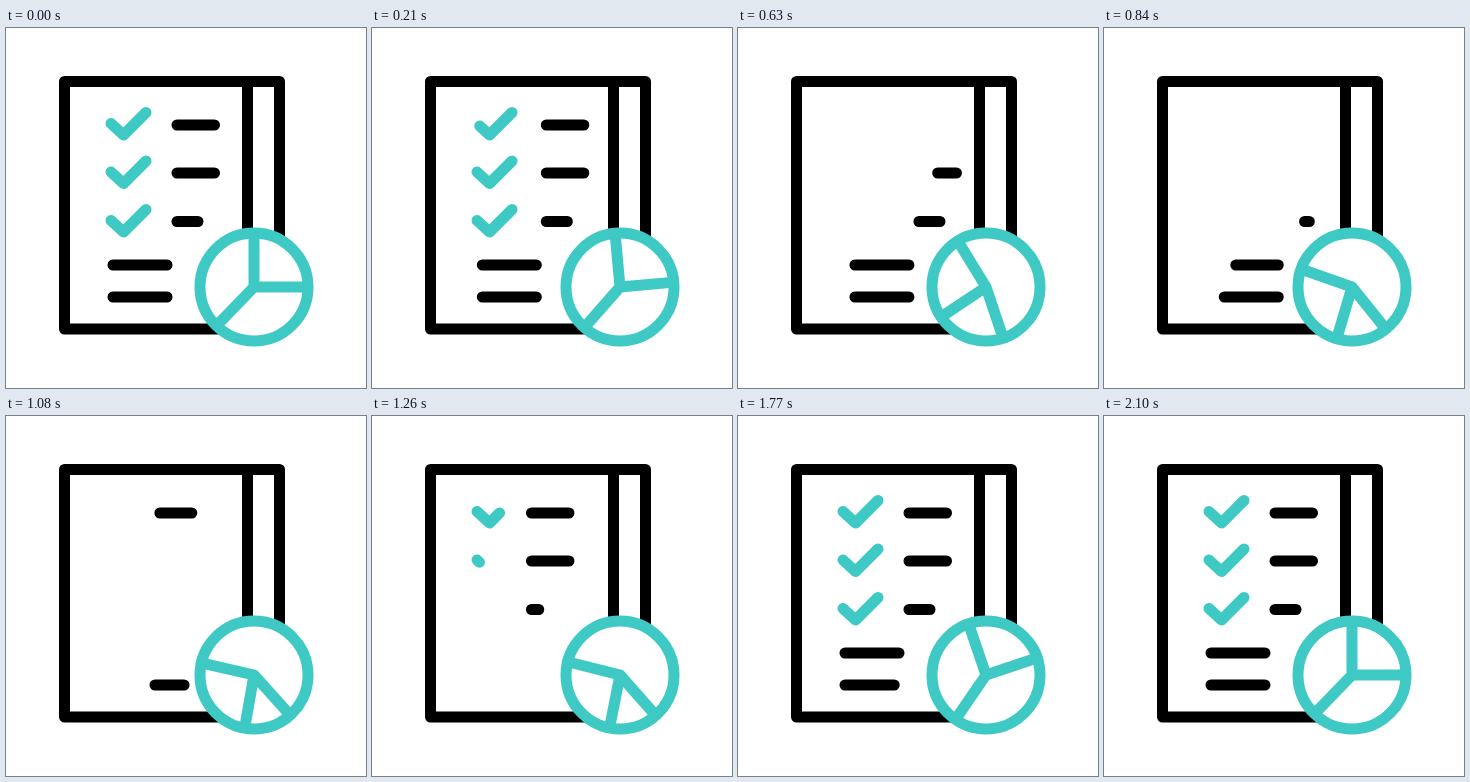
Recreate the animation shown at these times as an HTML page. Size 360 px wide and 360 px high, loop 2.13 s.

```html
<!DOCTYPE html>
<html lang="en">
<head>
<meta charset="utf-8">
<title>Checklist report</title>
<style>
  html, body { margin: 0; width: 100%; height: 100%; overflow: hidden; background: #fff; }
  svg { display: block; width: 100%; height: 100%; }
  .ink, .teal { fill: none; stroke-width: 11; stroke-linecap: round; stroke-linejoin: round; }
  .ink { stroke: #000; }
  .teal { stroke: #3ec9c4; }
</style>
</head>
<body>
<svg viewBox="0 0 360 360">
  <path class="ink" d="M58.5 53.5H273.5V259H248V301H58.5Z M241.5 53.5V230"/>
  <g id="checks" class="teal"></g>
  <g id="rows" class="ink"></g>
  <circle cx="248" cy="259" r="54" fill="#fff" stroke="#3ec9c4" stroke-width="11"/>
  <path id="spokes" class="teal"/>
</svg>
<script>
const LOOP = 2130;
const HALF = 1065;

// Times are [start, end] in ms: hide trims from the left, show grows from the left.
const rows = [
  { y: 97,    x: 171, len: 37.5, hide: [250, 590],  show: [965, 1100] },
  { y: 145,   x: 171, len: 37.5, hide: [445, 815],  show: [1090, 1220] },
  { y: 193.5, x: 171, len: 21,   hide: [630, 900],  show: [1215, 1345] },
  { y: 237,   x: 107, len: 54,   hide: [780, 1060], show: [1340, 1470] },
  { y: 269,   x: 107, len: 54,   hide: [930, 1255], show: [1462, 1800] }
];
const checks = [
  { y: 0,    hide: [190, 455], show: [1100, 1350] },
  { y: 48.5, hide: [288, 553], show: [1243, 1493] },
  { y: 97,   hide: [355, 620], show: [1382, 1632] }
];

const clamp = v => Math.min(1, Math.max(0, v));
const progress = (t, [from, to]) => clamp((t - from) / (to - from));

function addPath(group) {
  const path = document.createElementNS("http://www.w3.org/2000/svg", "path");
  document.getElementById(group).append(path);
  return path;
}

for (const row of rows) row.path = addPath("rows");
for (const check of checks) {
  check.path = addPath("checks");
  check.path.setAttribute("d", `M105 ${95.5 + check.y}l12.5 11.5l22.5 -22.5`);
  check.path.setAttribute("pathLength", 1);
}
const spokes = document.getElementById("spokes");

// 60 ms poses, with one longer hold every 630 ms.
function snap(t) {
  if (t < 30) return 0;
  if (t < 90) return 30;
  const m = t % 630;
  return t - m + (m < 90 ? 0 : 30 + 60 * Math.floor((m - 30) / 60));
}

function easeInOut(u, power) {
  const k = 2 ** (power - 1);
  return u < 0.5 ? k * u ** power : 1 - k * (1 - u) ** power;
}

function drawRow(row, t) {
  const gone = progress(t, row.hide);
  const shown = progress(t, row.show);
  const visible = gone < 1 || shown > 0;
  row.path.style.display = visible ? "" : "none";
  if (!visible) return;
  const leaving = gone < 1;
  const shift = leaving ? t * 0.0158 : Math.min(0, (t - 1632) * 0.031);
  const left = row.x + shift + (leaving ? gone * row.len : 0);
  const right = row.x + shift + (leaving ? 1 : shown) * row.len;
  row.path.setAttribute("d", `M${left} ${row.y}H${right}`);
}

function drawCheck(check, t) {
  const start = t < HALF ? progress(t, check.hide) : 0;
  const end = t < HALF ? 1 : progress(t, check.show);
  const visible = end > start;
  check.path.style.display = visible ? "" : "none";
  if (!visible) return;
  const whole = start === 0 && end === 1;
  check.path.style.strokeDasharray = whole ? "none" : `${end - start} 3`;
  check.path.style.strokeDashoffset = -start;
}

function drawSpokes(t) {
  const swing = t < HALF
    ? easeInOut(t / HALF, 3)
    : easeInOut(clamp((LOOP - t) / 1050), 4);
  const angles = [270 - 170 * swing, 360 - 167 * swing, 134 - 86 * swing];
  spokes.setAttribute("d", angles.map(deg => {
    const a = deg * Math.PI / 180;
    return `M248 259L${248 + 52 * Math.cos(a)} ${259 + 52 * Math.sin(a)}`;
  }).join(""));
}

function draw(t) {
  for (const row of rows) drawRow(row, t);
  for (const check of checks) drawCheck(check, t);
  drawSpokes(t);
}

const began = performance.now();
function tick() {
  draw(snap((performance.now() - began) % LOOP));
  requestAnimationFrame(tick);
}
tick();
</script>
</body>
</html>
```
